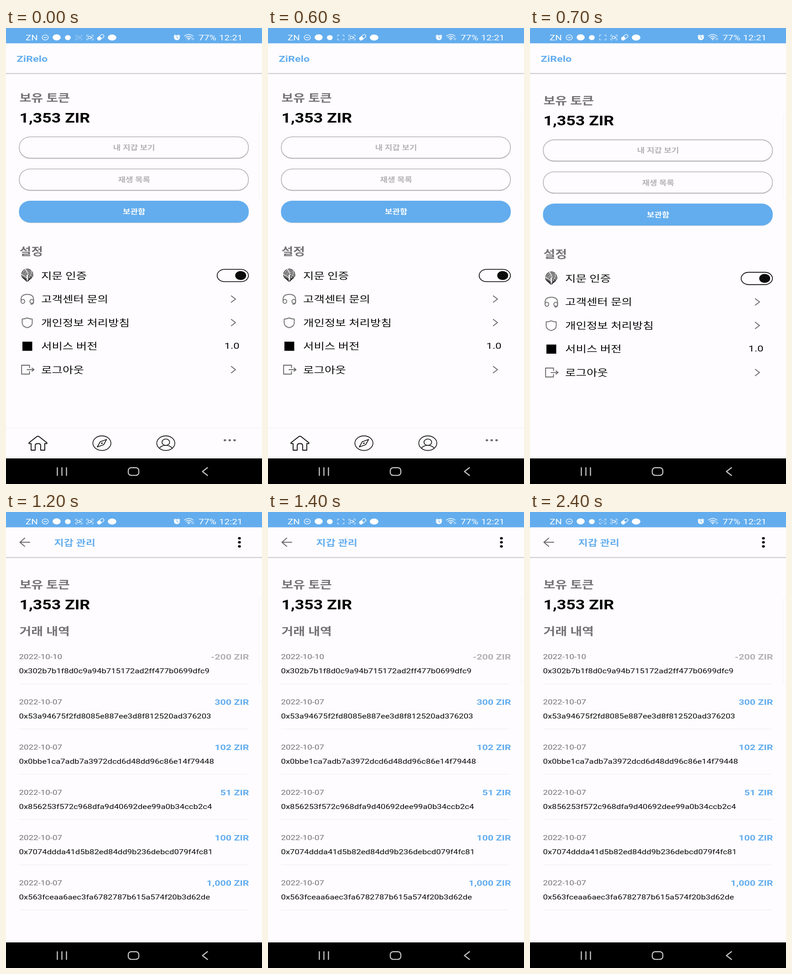
An HTML page that plays this animation: 561 px wide and 998 px high, repeating every 2900 ms.

```html
<!DOCTYPE html>
<html lang="ko">
<head>
<meta charset="utf-8">
<style>
html, body { margin: 0; width: 100%; height: 100%; overflow: hidden; background: #fefcfe; }
svg { display: block; width: 100vw; height: 100vh; }
text { font-family: Roboto, "Noto Sans CJK KR", "Noto Sans CJK", sans-serif; white-space: pre; }
.line { fill: none; stroke-linecap: round; stroke-linejoin: round; }
</style>
</head>
<body>
<svg id="stage" viewBox="0 0 561 998" preserveAspectRatio="none"></svg>
<script>
const BLUE = '#63adee', GRAY = '#757275', PALE = '#b3b1b3', INK = '#0b0b0b', PAPER = '#fefcfe', KEY = '#c0c0c0';
const WIDE = 1.25; // the phone screen is shown wider than it is

const text = (x, y, size, str, fill = INK, weight = 400, anchor = 'start') =>
  `<text transform="translate(${x} ${y}) scale(${WIDE} 1)" font-size="${size}" fill="${fill}" font-weight="${weight}" text-anchor="${anchor}">${str}</text>`;
const line = (d, stroke, width = 2, more = '') =>
  `<path class="line" d="${d}" stroke="${stroke}" stroke-width="${width}" ${more}/>`;
const oval = (x, y, rx, ry, paint = `fill="${INK}"`) =>
  `<ellipse cx="${x}" cy="${y}" rx="${rx}" ry="${ry}" ${paint}/>`;
const box = (x, y, w, h, rx, ry, paint) =>
  `<rect x="${x}" y="${y}" width="${w}" height="${h}" rx="${rx}" ry="${ry}" ${paint}/>`;
const group = (id, body) => `<g id="${id}">${body}</g>`;
const outline = (color, width) => `fill="none" stroke="${color}" stroke-width="${width}"`;

const brackets = x => line(`M${x - 7} 18.5v-3h3.5M${x + 3.5} 15.5h3.5v3M${x + 7} 23v3h-3.5M${x - 3.5} 26h-3.5v-3`, '#fff', 1.2, 'opacity=".85"');
const camera = x => box(x - 4, 18.3, 6, 4.8, 1, 1, outline('#fff', 1.2)) + line(`M${x + 2.5} 20.7l2-1.4v2.8z`, '#fff', 1);

const statusBar = () =>
  box(0, 0, 561, 33.5, 0, 0, `fill="${BLUE}"`) +
  text(43, 26.5, 16.4, 'ZN', '#fff') +
  oval(86, 20.8, 6.8, 5.6, outline('#fff', 1.3)) + line('M83 20.8h6', '#fff', 1.4) +
  oval(111, 20.5, 8.8, 6.8, 'fill="#fff"') +
  oval(135.5, 21, 6.3, 5.6, 'fill="#fff"') +
  group('blink', brackets(159.5) + group('lens', camera(159.5))) +
  brackets(184) + camera(184) +
  `<g transform="translate(207.5 20.5) rotate(-38)">${box(-8, -3.4, 16, 6.8, 3.5, 3.4, outline('#fff', 1.3))}${box(-8, -3.4, 8.5, 6.8, 3.5, 3.4, 'fill="#fff"')}</g>` +
  oval(232.5, 20.8, 9.5, 6.6, 'fill="#fff"') +
  oval(374.5, 21, 6.4, 5.6, 'fill="#fff"') +
  line('M374.5 17.8v3.4l2.6 1.4', BLUE, 1.2) + line('M368 17.5l3-2.5M378 15l3 2.5', '#fff', 1.6) +
  line('M391 17.5q9.5-7 19 0M394 20.5q6.5-4.6 13 0M397 23.3q3.5-2.4 7 0', '#fff', 1.5) +
  oval(400.5, 25.3, 1.6, 1.3, 'fill="#fff"') + line('M408 22v4M411 22v4', '#fff', 1) +
  text(422, 26.5, 16.8, '77%', '#fff') + text(467, 26.5, 16.5, '12:21', '#fff');

const systemBar = () =>
  box(0, 942, 561, 56, 0, 0, 'fill="#000"') +
  line('M112.5 961.5v18.5M122.5 961.5v18.5M132.5 961.5v18.5', KEY, 2.5, 'style="stroke-linecap:butt"') +
  box(268, 962.3, 23, 16.8, 7, 5.6, outline(KEY, 2.4)) +
  line('M441.5 962.3l-11 8.5 11 8.5', KEY, 2.4);

const balance = () =>
  text(29.5, 160.5, 22.5, '보유 토큰', GRAY, 700) + text(29.5, 207, 28.6, '1,353 ZIR', '#000', 700);

const button = (y, label, solid) =>
  box(29.2, y + 2, 502, 46.5, 24, 22, 'fill="#d0d0d0" opacity=".75"') +
  box(29.2, y, 502, 46.5, 24, 22, `fill="${solid ? BLUE : PAPER}" stroke="${solid ? BLUE : PALE}" stroke-width="1.6"`) +
  text(280.7, y + 28.7, 14.4, label, solid ? '#fff' : PALE, 700, 'middle');

const chevron = y => line(`M493.7 ${y - 7}l9.3 7-9.3 7`, '#6d6b6d', 1.9);

// nested arches whose legs draw together below
function fingerprint() {
  let arches = '';
  for (let k = 1; k < 6; k++) {
    const rx = k * 2.5, lean = rx * 0.55, drop = 15 - k * 1.2;
    arches += line(`M${46.5 - rx + lean} ${541 + drop}q${-lean} ${-drop / 2} ${-lean} ${-drop}a${rx} ${k * 2.7} 0 0 1 ${2 * rx} 0q0 ${drop / 2} ${-lean} ${drop}`,
      '#222', 1.4, `stroke-dasharray="${7 + k} 2.6"`);
  }
  return arches;
}

const settings = () =>
  text(29.5, 497, 22.5, '설정', GRAY, 700) +
  ['지문 인증', '고객센터 문의', '개인정보 처리방침', '서비스 버전', '로그아웃']
    .map((label, i) => text(77, 549.5 + i * 51.5, 20.4, label, INK, 500)).join('') +
  fingerprint() +
  box(462.7, 528.3, 68.6, 27, 16.5, 13.5, outline('#000', 1.6)) + oval(514.3, 541.7, 12, 9.8) +
  line('M33 598v-4q0-11 13.7-11t13.7 11v6q0 4.5-6 4.5', '#777', 2) +
  oval(37, 598.3, 4, 4.4, outline('#777', 2)) + oval(56.4, 598.3, 4, 4.4, outline('#777', 2)) +
  line('M46.5 634.5q6 2.5 11 2.5v8.5c0 6-5 9-11 10.5c-6-1.5-11-4.5-11-10.5v-8.5q5 0 11-2.5z', '#777', 2) +
  box(36, 686.5, 21.5, 20, 0, 0, 'fill="#000"') +
  line('M51.5 743.5v-5.5h-17.3v19.5h17.3v-5.5M46 747.8h15M57 744.3l4.5 3.5-4.5 3.5', '#666', 1.9) +
  [593.3, 644.7, 747.7].map(chevron).join('') +
  text(511.5, 702, 19, '1.0', INK, 400, 'end');

const tabs = () =>
  line('M0 876h561', '#f0eff0', 1) +
  line('M55 909.5h-4.5q-1-1 .5-2.2l16.5-13q2.5-1.6 5 0l16.5 13q1.5 1.2.5 2.2h-4.5v14.5h-9v-10q0-4.5-6-4.5t-6 4.5v10h-9z', '#111', 1.9) +
  oval(210.2, 908.6, 19.8, 16, outline('#111', 1.6)) +
  line('M220.5 900.5l-6.5 11.5-14 5 6.5-11.5z', '#111', 1.6) + oval(210.2, 908.7, 1.8, 1.5) +
  oval(350.2, 908.6, 19.8, 16, outline('#111', 1.6)) +
  oval(350.2, 906.5, 8.4, 7, outline('#111', 1.6)) + line('M336.5 919.5q4-6 13.7-6t13.7 6', '#111', 1.6) +
  [479.7, 490.2, 500.9].map(x => oval(x, 902.2, 2.7, 2.2, 'fill="#6a686a"')).join('');

const transfers = [
  ['10', '-200', '302b7b1f8d0c9a94b715172ad2ff477b0699dfc9'],
  ['07', '300', '53a94675f2fd8085e887ee3d8f812520ad376203'],
  ['07', '102', '0bbe1ca7adb7a3972dcd6d48dd96c86e14f79448'],
  ['07', '51', '856253f572c968dfa9d40692dee99a0b34ccb2c4'],
  ['07', '100', '7074ddda41d5b82ed84dd9b236debcd079f4fc81'],
  ['07', '1,000', '563fceaa6aec3fa6782787b615a574f20b3d62de'],
];
const transfer = ([day, amount, hash], i) => {
  const y = 316 + i * 99;
  return text(28.5, y + 5.5, 15, '2022-10-' + day, GRAY) +
    text(532.5, y + 6.5, 17.2, amount + ' ZIR', amount[0] === '-' ? PALE : BLUE, 700, 'end') +
    text(28.5, y + 36.6, 14.8, '0x' + hash) +
    line(`M29 ${y + 60}h500`, '#efedef', 1.2);
};

const home = () =>
  text(23.5, 73.7, 18.8, 'ZiRelo', BLUE, 700) +
  group('page', balance() + button(238.3, '내 지갑 보기') + button(308.5, '재생 목록') + button(378.7, '보관함', true) + settings()) +
  group('tabs', tabs());

const wallet = () =>
  line('M52 66.2h-21M41 57.2l-10.5 9 10.5 9', '#6a686a', 2.1) +
  text(105.5, 73.5, 18.4, '지갑 관리', BLUE, 700) +
  [57.5, 66.3, 75.2].map(y => oval(511.5, y, 3.2, 2.7)).join('') +
  `<g transform="translate(0 6.3)">${balance()}</g>` +
  text(29.5, 269, 22.5, '거래 내역', GRAY, 700) +
  transfers.map(transfer).join('');

const part = id => document.getElementById(id);
const show = (id, on) => { part(id).style.display = on ? '' : 'none'; };

part('stage').innerHTML = box(0, 0, 561, 998, 0, 0, `fill="${PAPER}"`) +
  line('M561 190h-6v185h6', '#f4f3f4', 1) +
  line('M0 99.5h561', '#bdbbbd', 1.6) + line('M0 101h561', '#efeeef', 1) +
  group('home', home()) + group('wallet', wallet()) + statusBar() + systemBar();

const start = performance.now();
function draw() {
  const t = (performance.now() - start) % 2900;
  const leaving = t >= 700, opened = t >= 900;
  show('home', !opened);
  show('wallet', opened);
  show('tabs', !leaving);
  part('page').setAttribute('transform', `translate(0 ${leaving ? 6.3 : 0})`);
  const lit = t < 100 || (t >= 900 && t < 1400) || (t >= 1900 && t < 2400);
  part('blink').setAttribute('opacity', t < 100 ? 0.4 : 1);
  part('lens').setAttribute('opacity', lit ? 1 : t >= 2400 ? 0.3 : 0);
  requestAnimationFrame(draw);
}
draw();
</script>
</body>
</html>
```
